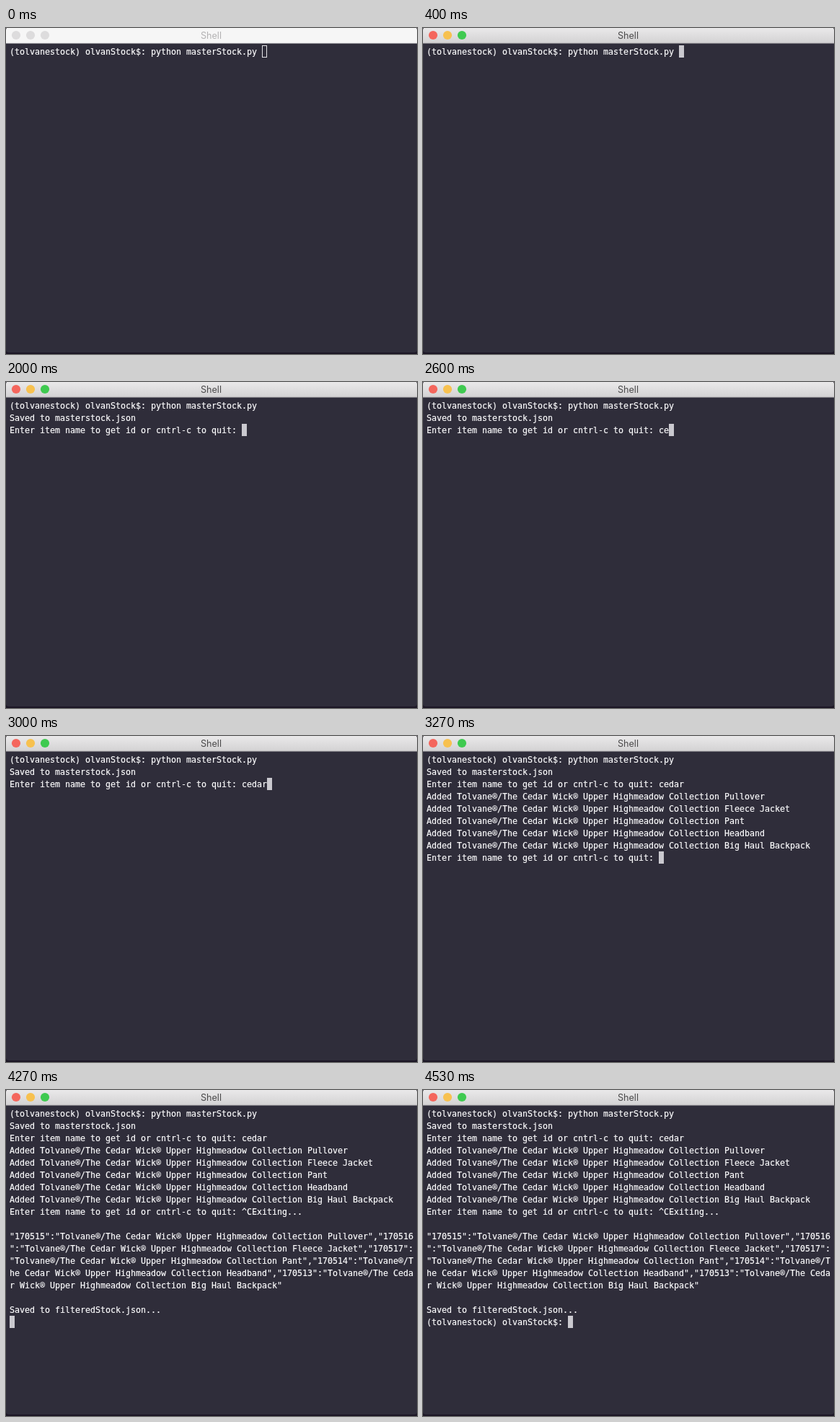
An HTML page that plays this animation: 570x452 px, repeating every 5540 ms.

```html
<!DOCTYPE html>
<html lang="en">
<head>
<meta charset="utf-8">
<title>Shell</title>
<style>
  html, body { margin: 0; width: 100%; height: 100%; overflow: hidden; background: #1b1524; }
  svg { display: block; }
  .title { font: 12.6px Inter, Roboto, sans-serif; text-anchor: middle; fill: #4b4a4b; }
  .rows text {
    font: 11.63px "DejaVu Sans Mono", "Noto Sans Mono", monospace;
    white-space: pre; fill: #fbfbfc; stroke: #fbfbfc; stroke-width: .2;
  }
  .cursor { fill: #cac9cf; }
  .bar { fill: url(#metal); }
  .edge { fill: #b5b4b6; }
  .idle .title { fill: #b3b2b3; }
  .idle .bar { fill: #f6f6f6; }
  .idle .edge { fill: #dcdbdd; }
  .idle .lights circle { fill: #dddcdd; }
  .idle .cursor { fill: none; stroke: #e4e3e7; }
</style>
</head>
<body>
<svg id="stage" class="idle" width="570" height="452" viewBox="0 0 570 452">
  <defs>
    <linearGradient id="metal" x2="0" y2="1">
      <stop stop-color="#ebeaeb"/>
      <stop offset="1" stop-color="#d3d2d3"/>
    </linearGradient>
    <clipPath id="frame"><rect y="-1" width="570" height="451" rx="4"/></clipPath>
  </defs>
  <g clip-path="url(#frame)">
    <rect width="570" height="450" fill="#2f2d3a"/>
    <rect class="bar" y="-1" width="570" height="22"/>
    <rect class="edge" y="20.5" width="570" height="1"/>
  </g>
  <g class="lights">
    <circle cx="14" cy="10" r="6.1" fill="#f4665d"/>
    <circle cx="34" cy="10" r="6.1" fill="#f7c14f"/>
    <circle cx="54" cy="10" r="6.1" fill="#3fca50"/>
  </g>
  <text class="title" x="284.5" y="15">Shell</text>
  <rect class="cursor" id="cursor"/>
  <g class="rows" id="rows"></g>
</svg>
<script>
const LOOP = 5540, FOCUS = 400;
const COLS = 80, CELL = 7, LINE = 17, LEFT = 5, TOP = 24;

const stage = document.getElementById('stage');
const cursor = document.getElementById('cursor');
const rows = document.getElementById('rows');

const prompt = '(tolvanestock) olvanStock$: ';
const ask = 'Enter item name to get id or cntrl-c to quit: ';
const brand = 'Tolvane®/The Cedar Wick® Upper Highmeadow Collection ';
const items = [
  [170515, 'Pullover'],
  [170516, 'Fleece Jacket'],
  [170517, 'Pant'],
  [170514, 'Headband'],
  [170513, 'Big Haul Backpack']
];
const added = items.map(([, kind]) => `Added ${brand}${kind}\n`).join('');
const json = items.map(([id, kind]) => `"${id}":"${brand}${kind}"`).join(',');

// Terminal output: [time in ms, text appended]
const output = [
  [0, prompt + 'python masterStock.py '],
  [670, '\n'],
  [1530, 'Saved to masterstock.json\n' + ask],
  [2530, 'c'], [2600, 'e'], [2730, 'd'], [2800, 'a'], [2930, 'r'],
  [3270, '\n' + added + ask],
  [4270, `^CExiting...\n\n${json}\n\nSaved to filteredStock.json...\n`],
  [4530, prompt]
];

const wrap = text => text.split('\n')
  .flatMap(line => line.match(new RegExp(`.{1,${COLS}}`, 'g')) || ['']);

function place(el, attrs) {
  for (const name in attrs) el.setAttribute(name, attrs[name]);
}

function drawRows(lines) {
  rows.replaceChildren(...lines.map((line, i) => {
    const el = document.createElementNS('http://www.w3.org/2000/svg', 'text');
    place(el, { x: LEFT, y: TOP + LINE * i + 13 });
    el.textContent = line;
    return el;
  }));
}

function drawCursor(lines, idle) {
  const x = LEFT + lines.at(-1).length * CELL;
  const y = TOP + (lines.length - 1) * LINE;
  place(cursor, idle
    ? { x: x + .5, y: y + .5, width: CELL - 1, height: LINE - 1 }
    : { x, y, width: CELL, height: LINE });
}

let shown = '';
function draw(now) {
  const t = now % LOOP;
  const idle = t < FOCUS;
  const text = output.filter(([at]) => at <= t).map(([, part]) => part).join('');
  if (shown !== text + idle) {
    shown = text + idle;
    const lines = wrap(text);
    stage.classList.toggle('idle', idle);
    drawRows(lines);
    drawCursor(lines, idle);
  }
}

const start = performance.now();
function tick() {
  draw(performance.now() - start);
  requestAnimationFrame(tick);
}
tick();
</script>
</body>
</html>
```
